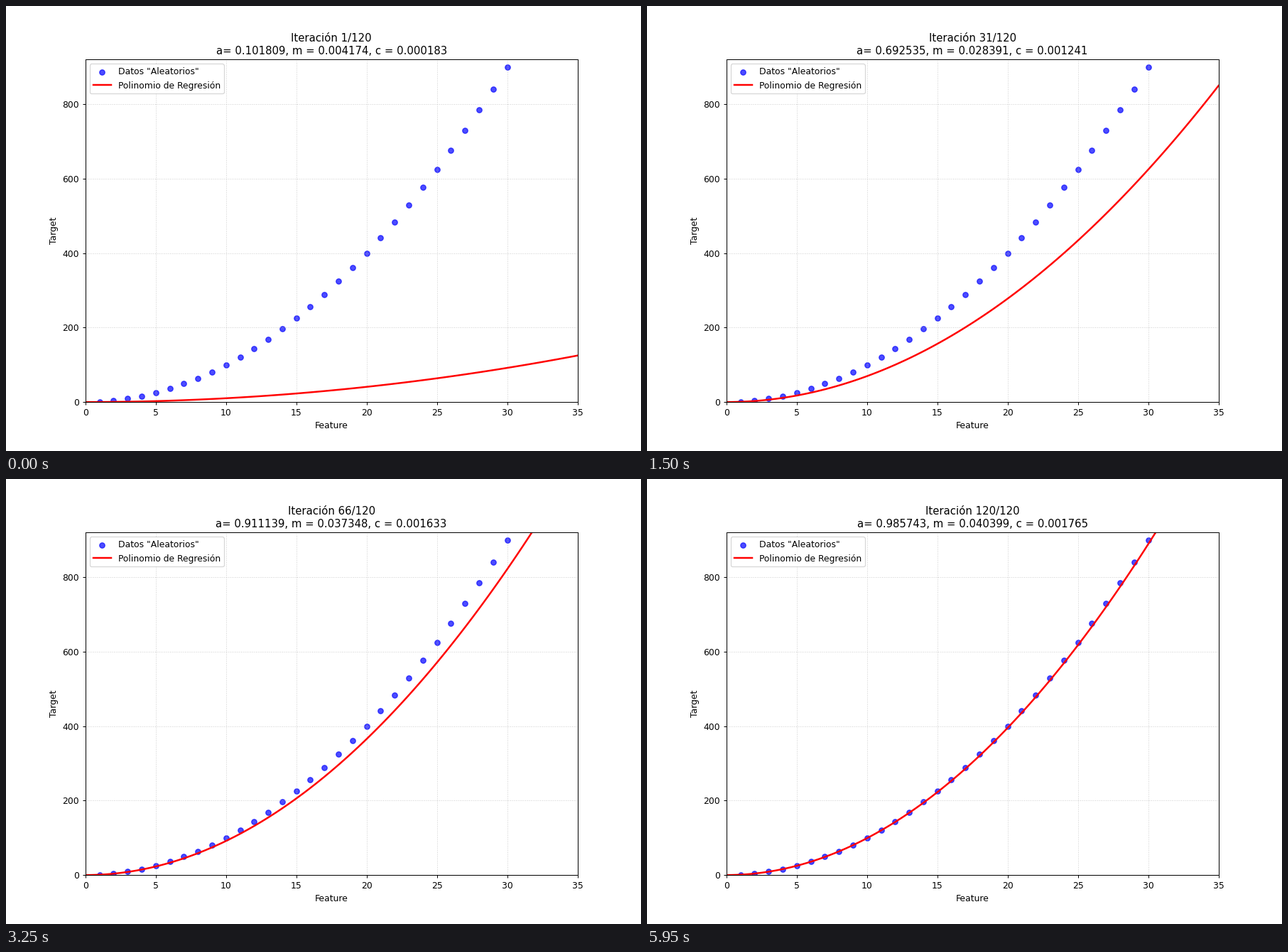
Write a matplotlib script that moves like this. It is 894 px wide and 626 px high and loops after 6 s.

```python
import numpy as np
import matplotlib.pyplot as plt
from matplotlib.animation import FuncAnimation

STEPS = 120
WARMUP = 3  # descent steps already taken when the first picture appears
RATE = 1e-7

plt.rcParams["font.family"] = "DejaVu Sans"

x = np.arange(1, 31, dtype=float)
y = x ** 2


def descend(steps):
    """Gradient descent on a*x^2 + m*x + c; one (a, m, c) row per step."""
    basis = np.stack([x ** 2, x, np.ones_like(x)])
    coef = np.zeros(3)
    rows = []
    for _ in range(steps):
        error = coef @ basis - y
        coef = coef - RATE * 2 / len(x) * (basis @ error)
        rows.append(coef)
    return rows


history = descend(STEPS + WARMUP)[WARMUP - 1:]

# 894 x 626 pixels
fig, ax = plt.subplots(figsize=(10, 7.0023), dpi=89.4)
ax.scatter(x, y, color="blue", alpha=0.7, label='Datos "Aleatorios"')
xs = np.linspace(0, 35, 100)
curve, = ax.plot(xs, 0 * xs, color="red", linewidth=2,
                 label="Polinomio de Regresión")
ax.set_xlim(0, 35)
ax.set_ylim(0, 920)
ax.set_xlabel("Feature")
ax.set_ylabel("Target")
ax.grid(True, linestyle=":", alpha=0.6)
ax.legend(loc="upper left")
title = ax.set_title("")


def update(i):
    a, m, c = history[i]
    curve.set_ydata(a * xs ** 2 + m * xs + c)
    title.set_text(f"Iteración {i + 1}/{STEPS}\n"
                   f"a= {a:.6f}, m = {m:.6f}, c = {c:.6f}")
    return curve, title


anim = FuncAnimation(fig, update, frames=STEPS, interval=50,
                     repeat=True, repeat_delay=0, blit=False)
plt.show()
```
